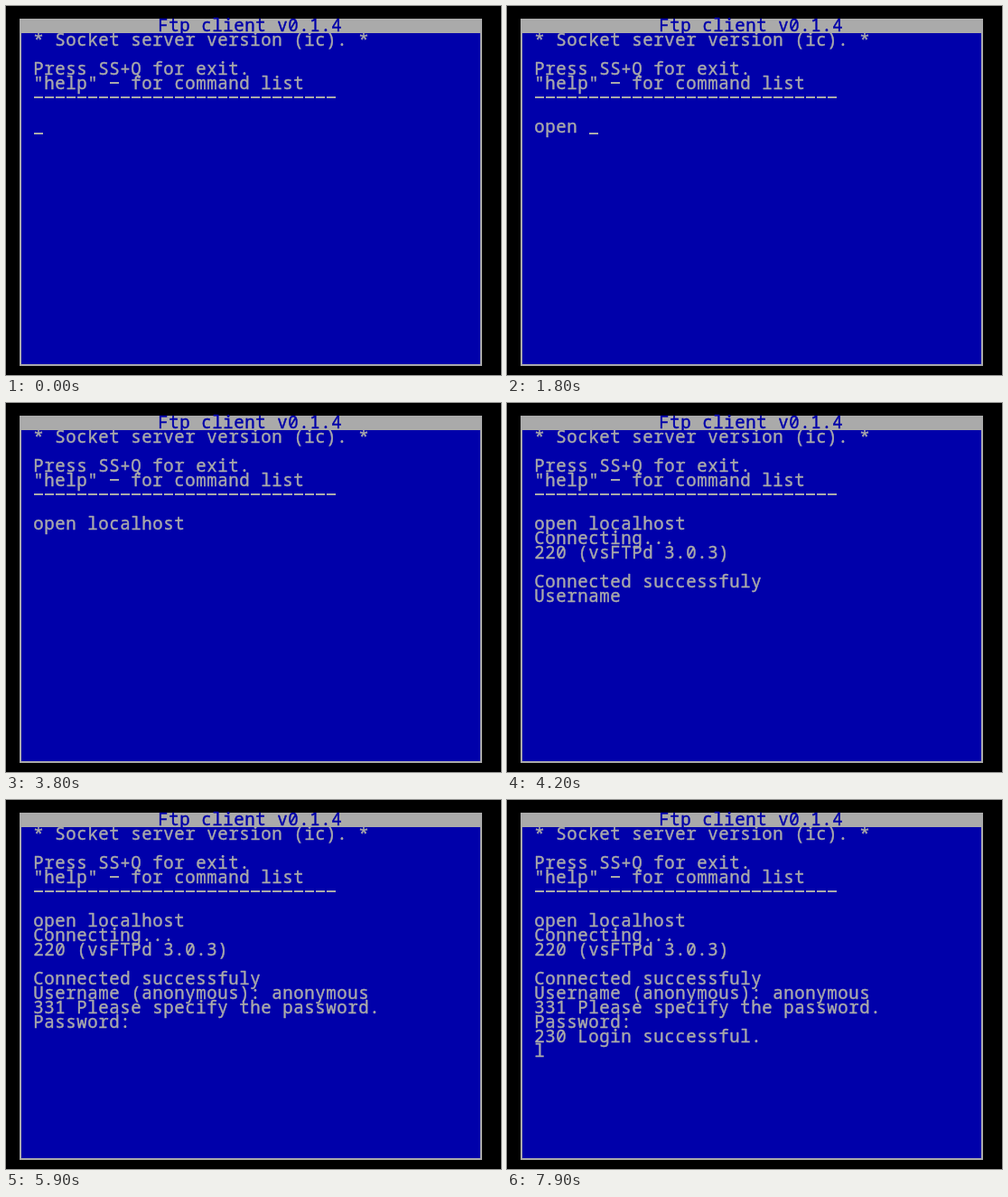
An HTML page with a canvas that plays this animation: 548x408 px, repeating every 8000 ms.

```html
<!DOCTYPE html>
<html lang="en">
<head>
<meta charset="utf-8">
<title>Ftp client</title>
<style>
  html, body { margin: 0; width: 100%; height: 100%; overflow: hidden; background: #000; }
  canvas { display: block; }
</style>
</head>
<body>
<canvas id="stage" width="548" height="408"></canvas>
<script>
const ctx = document.getElementById("stage").getContext("2d");
const BLUE = "#0000aa", GREY = "#aaaaaa";
const CELL = 12, ROW = 16, LEFT = 31, TOP = 30, LOOP = 8000;

const INTRO = `* Socket server version (ic). *

Press SS+Q for exit.
"help" - for command list
${"-".repeat(28)}

`;

// [time in ms, text added, cursor visible]
const STEPS = [
  [0, INTRO, 1], [200, "", 0], [400, "", 1], [700, "", 0], [900, "", 1],
  [1000, "o", 1], [1200, "p", 1], [1300, "e", 1], [1400, "n", 1],
  [1500, "", 0], [1700, "", 1], [1800, " ", 1], [2100, "", 0], [2300, "l", 1],
  [2600, "o", 1], [2700, "c", 1], [2800, "a", 1], [2900, "l", 1], [3000, "h", 1],
  [3200, "o", 1], [3300, "s", 1], [3400, "t", 1], [3500, "", 0], [3600, "", 1],
  [3800, "\n", 0], [4000, "Connecting...\n", 0],
  [4100, "220 (vsFTPd 3.0.3)\n\n", 0],
  [4200, "Connected successfuly\nUsername", 0],
  [4300, " (anonymous): ", 0], [4500, "", 1], [4800, "", 0], [5000, "", 1],
  [5200, "anonymous\n", 0], [5300, "331 Pleas", 0],
  [5400, "e specify the password.\n", 0], [5500, "Password: ", 0],
  [5600, "", 1], [5900, "", 0], [6100, "", 1], [6300, "\n", 0],
  [6400, "230 Login", 0], [6500, " successful.\n", 0],
  [6700, "", 1], [6900, "", 0], [7200, "", 1], [7400, "", 0], [7600, "", 1],
  [7900, "l", 0]
];

function box(color, x, y, w, h) {
  ctx.fillStyle = color;
  ctx.fillRect(x, y, w, h);
}

// Draws one line on the character grid; dashes fill the glyph width.
// The thin outline brings the letter strokes to about 2px.
function print(line, x, y, color) {
  ctx.fillStyle = ctx.strokeStyle = color;
  [...line].forEach((ch, i) => {
    const cx = x + i * CELL;
    if (ch === "-") {
      ctx.fillRect(cx, y + 6, 10, 2);
    } else {
      ctx.fillText(ch, cx + 5, y + 13.8);
      ctx.strokeText(ch, cx + 5, y + 13.8);
    }
  });
}

function draw(now) {
  const t = now % LOOP;
  const done = STEPS.filter(step => step[0] <= t);
  const lines = done.map(step => step[1]).join("").split("\n");
  const cursorOn = done[done.length - 1][2];

  box("#000", 0, 0, 548, 408);
  box(GREY, 15, 14, 512, 384);
  box(BLUE, 17, TOP, 508, 366);

  ctx.font = '19px "Noto Sans Mono", "Liberation Mono", monospace';
  ctx.textAlign = "center";
  ctx.lineWidth = 0.4;
  ctx.lineJoin = "round";
  print("Ftp client v0.1.4", 169, 14, BLUE);
  lines.forEach((line, i) => print(line, LEFT, TOP + i * ROW, GREY));

  if (cursorOn) {
    const row = lines.length - 1;
    box(GREY, LEFT + lines[row].length * CELL, TOP + row * ROW + 14, 10, 2);
  }
}

const start = performance.now();
function tick() {
  draw(performance.now() - start);
  requestAnimationFrame(tick);
}
tick();
</script>
</body>
</html>
```
